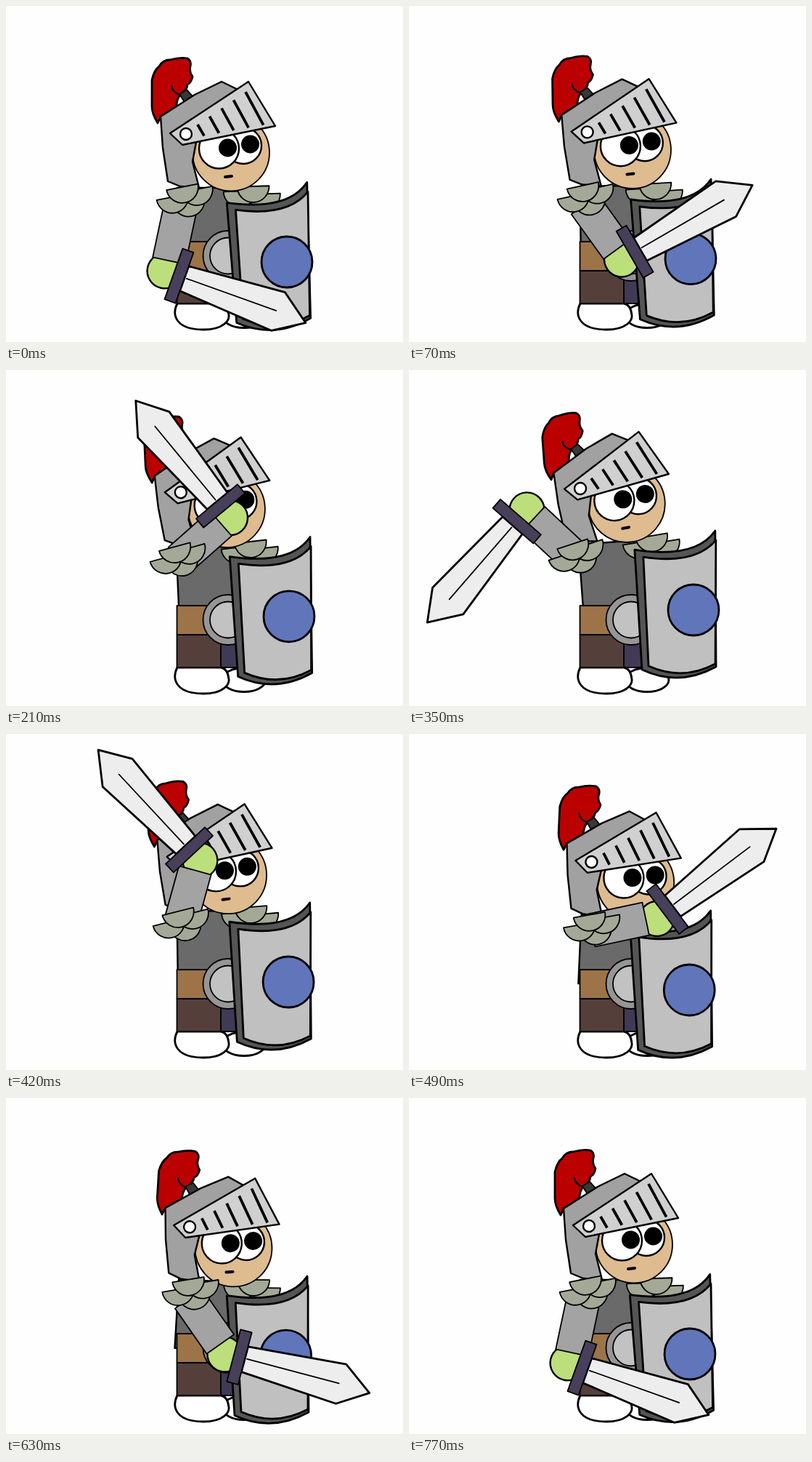
These frames come from a looping animation (547 px wide and 462 px high, 1470 ms). An HTML page:

```html
<!DOCTYPE html>
<html lang="en">
<head>
<meta charset="utf-8">
<title>Knight swinging a sword</title>
<style>
  html, body { margin: 0; width: 100%; height: 100%; overflow: hidden; background: #fefefe; }
  svg { display: block; width: 547px; height: 462px; }
  .thin { stroke-width: 1.8; }
  .bold { stroke-width: 2.8; }
</style>
</head>
<body>
<svg viewBox="0 0 547 462" stroke="#000" stroke-width="2.4" stroke-linejoin="round" stroke-linecap="round">
  <defs><path id="plate" d="M-22 0A22 22 0 0 0 22 0Z"/></defs>

  <g fill="#fff" class="bold">
    <ellipse cx="328" cy="426" rx="30" ry="16.500"/>
    <path d="M236 409C228 425 234 445 272 445C300 445 308 432 307 425C306 416 302 410 296 409Z"/>
  </g>

  <path id="torso" d="M236 250H325V345H236Z" fill="#6a6a6a"/>

  <g class="thin">
    <path d="M296 364H330V409H296Z" fill="#403a56"/>
    <path d="M235.500 364H296V409H235.500Z" fill="#553f3b"/>
    <path d="M235.500 324H325V364H235.500Z" fill="#9c7448"/>
    <circle cx="306" cy="343.500" r="34.500" fill="#969696"/>
    <circle cx="306" cy="343.500" r="25" fill="#c2c2c2"/>
  </g>

  <g id="farPad" fill="#a3a996" class="thin">
    <use href="#plate" x="-19" y="6"/>
    <use href="#plate" x="15" y="11"/>
    <use href="#plate"/>
  </g>

  <g id="head"><g transform="translate(-248 -176)">
    <path class="bold" fill="#b00" d="M209 161Q201 148 201 138V102Q204 88 211 83Q216 74 226 74Q240 70 250 72Q256 76 254 83Q252 90 257 97Q255 106 250 108Q250 115 240 122Q235 128 235 138L213 152Z"/>
    <path fill="none" d="M228 110Q229 118 239 122"/>
    <path class="thin" fill="#383838" d="M239 121L249 115L258 125L247 134Z"/>
    <circle class="thin" cx="310" cy="201.500" r="53" fill="#dfbb90"/>
    <path fill="#a1a1a1" d="M213 152L260 122L297 104L330 120L262 187L257 214L266 250L240 248L223 241L216 195Z"/>
    <g fill="#fff">
      <circle cx="327" cy="192" r="25"/>
      <circle cx="293.500" cy="196" r="27.500"/>
    </g>
    <g fill="#000" stroke="none">
      <circle cx="305.500" cy="195" r="12.500"/>
      <circle cx="336.500" cy="190" r="12.500"/>
    </g>
    <path d="M302 235L311 234" stroke-width="4"/>
    <path fill="#d0d0d0" d="M226 175L334 104L371 165L243 191Z"/>
    <path id="slits" stroke-width="3.800" stroke-linecap="butt"/>
    <circle cx="248" cy="176" r="8" fill="#fff"/>
  </g></g>

  <g id="shield" class="bold">
    <path fill="#555" d="M-81 -83Q3 -70 30 -109L31 78Q-20 106 -71 82Z"/>
    <path fill="#c0c0c0" d="M-69 -73Q3 -62 31 -96L30 74Q-15 98 -62 77Z"/>
    <circle r="35" fill="#6175ba"/>
  </g>

  <g id="arm">
    <circle cx="96" cy="3" r="24" fill="#bcdf7b"/>
    <path class="thin" fill="#a3a3a3" d="M5 -23H81V23H5Z"/>
    <g id="sword">
      <path class="bold" fill="#ededed" d="M27 -17L164 -28L205 2L164 28L27 19Z"/>
      <path class="thin" d="M30 0H161"/>
      <path class="thin" fill="#483f5a" d="M11 -37H27V37H11Z"/>
    </g>
  </g>
  <g id="nearPad" fill="#a3a996" class="thin">
    <use href="#plate" x="4" y="11"/>
    <use href="#plate" x="18" y="-2"/>
    <use href="#plate" x="-17" y="2"/>
    <use href="#plate" x="-1" y="-9"/>
  </g>
</svg>

<script>
const STEP = 70, LOOP = 1470;
const $ = id => document.getElementById(id);

// Visor slits grow longer towards the front.
$('slits').setAttribute('d', [0, 1, 2, 3, 4].map(i =>
  `M${264 + 16.5 * i} ${163 - 11.2 * i}l${9 + 3.9 * i} ${15.5 + 7.5 * i}`).join(''));

// The body leans (degrees) and lifts (0 to 1); arm and wrist turn in degrees.
const rest = { at: 0, lean: 0, lift: 0, arm: 102, wrist: -82.3 };
const poses = [
  rest,
  { at: 350, lean: -4.2, lift: 1, arm: -137, wrist: -92 },
  { at: 490, lean: 2.6, lift: 0, arm: -12, wrist: -25 },
  { at: 630, lean: 3.4, lift: -0.1, arm: 55, wrist: -40.2 },
  { ...rest, at: 770 }
];

function poseAt(t) {
  const i = Math.max(1, poses.findIndex(p => p.at >= t));
  const a = poses[i - 1], b = poses[i], k = (t - a.at) / (b.at - a.at);
  return key => a[key] + (b[key] - a[key]) * k;
}

function place(id, x, y, angle, pivot = '') {
  $(id).setAttribute('transform', `translate(${x} ${y}) rotate(${angle} ${pivot})`);
}

function draw(ms) {
  const t = Math.min(770, Math.floor(ms % LOOP / STEP) * STEP);
  const pose = poseAt(t), lean = pose('lean'), lift = pose('lift');

  place('torso', 0, -13 * lift, lean, '275 285');
  place('head', 248 + 1.3 * lean - 6.5 * lift, 176 - 13 * lift, lean);
  place('farPad', 340.5 - 6.4 * lift, 248 - 20 * lift, 0.6 * lean - 5 * lift - 2);
  place('nearPad', 245.5 + 2.1 * lean - 7.7 * lift, 257.5 - 10 * lift, 0.3 * lean - 6 * lift - 11);
  place('shield', 387 - 0.3 * lean + 3.7 * lift, 352 - 22 * lift, 0.35 * lean + 2.6 * lift - 1.2);
  place('arm', 241.5 + 2.1 * lean - 2 * lift, 271 - 11 * lift, pose('arm'));
  place('sword', 96, 1, pose('wrist'));
}

const start = performance.now();
function tick() {
  draw(performance.now() - start);
  requestAnimationFrame(tick);
}
tick();
</script>
</body>
</html>
```
